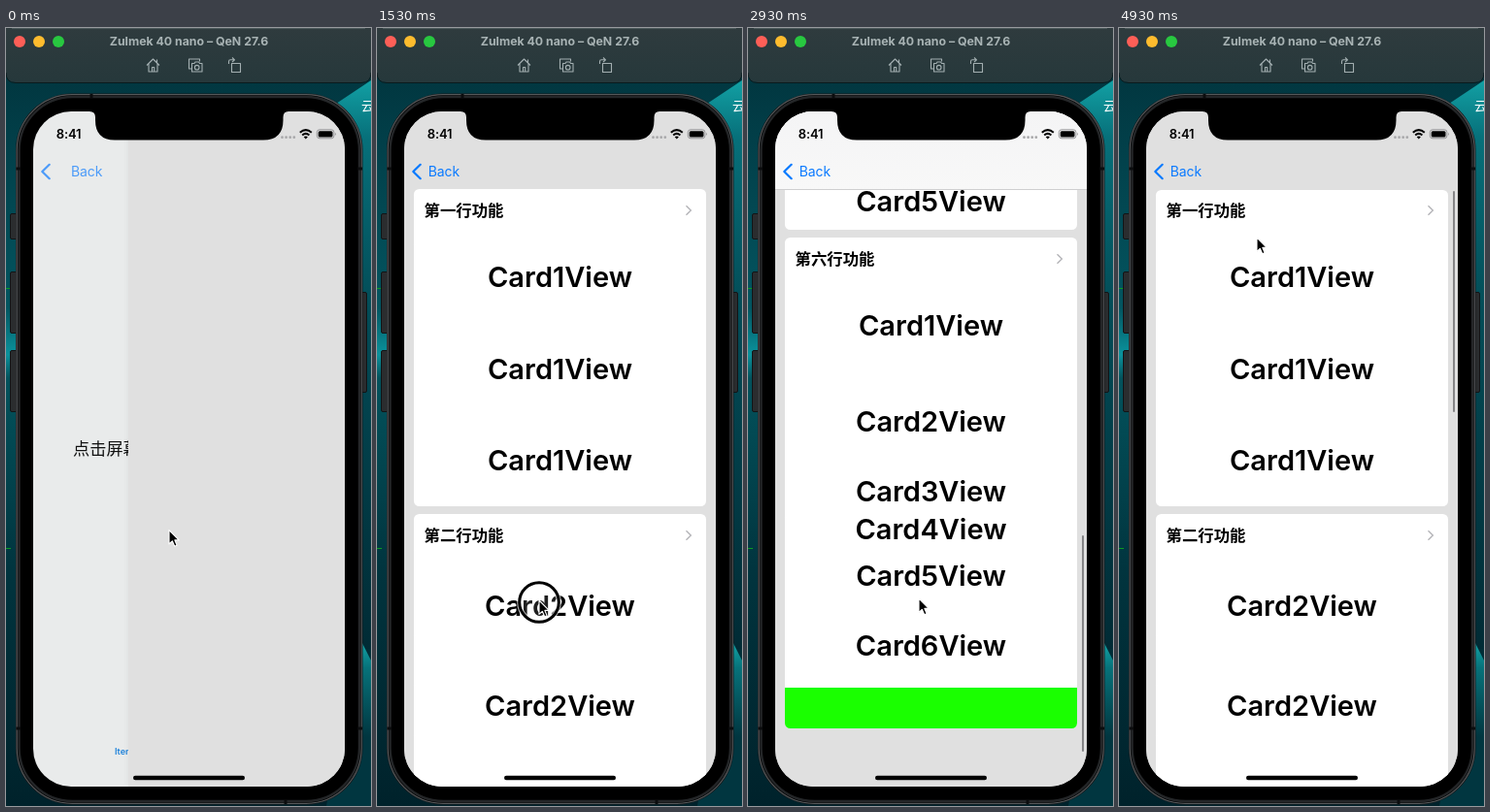
These frames come from a looping animation (376 px wide and 802 px high, 4990 ms). An HTML page:

```html
<!DOCTYPE html>
<html lang="zh">
<head>
<meta charset="utf-8">
<title>Expandable cards</title>
<style>
html, body { margin: 0; width: 100%; height: 100%; overflow: hidden; background: #00262e; }
#stage { position: relative; width: 376px; height: 802px; overflow: hidden; font-family: Inter, sans-serif; }
#stage > svg { position: absolute; left: 0; top: 0; }
#screen { position: absolute; left: 28px; top: 86px; width: 321px; height: 696px; border-radius: 39px; overflow: hidden; background: #e9ebeb; }
#world, #page { position: absolute; left: -28px; top: -86px; width: 376px; height: 802px; }
#page { left: 0; top: 0; }
#hint, #tab, #nav, #thumb, .fill, .card, .head { position: absolute; white-space: nowrap; }
.fill { left: 28px; top: 86px; width: 321px; height: 696px; background: #e0e0e0; box-shadow: 0 0 7px rgba(0,0,0,.06); }
.cjk { font-family: "Noto Sans CJK SC", "Noto Sans CJK", sans-serif; line-height: 24px; }
#hint { left: 136px; top: 421px; font-size: 17.2px; color: #111; }
#tab { left: 179px; top: 740px; font-size: 9px; line-height: 12px; font-weight: 600; color: #1b80da; }
.card { left: 38px; width: 301px; border-radius: 5.5px; background: #fff; overflow: hidden; }
.head { left: 10.5px; top: 8.5px; font-size: 16.4px; font-weight: 700; color: #000; }
.rows { position: absolute; left: 0; right: 0; text-align: center; font-size: 29px; font-weight: 600; color: #000; }
.green { background: #1aff00; }
.card svg { position: absolute; left: 279px; top: 15.5px; }
#nav { left: 28px; top: 86px; width: 321px; height: 80px; background: linear-gradient(#f4f4f5, #f8f8f8); border-bottom: 1px solid #cfcfd0; }
#thumb { left: 343.6px; width: 2.8px; border-radius: 2px; background: #858587; }
</style>
</head>
<body>
<div id="stage">
  <svg width="376" height="802" viewBox="0 0 376 802">
    <defs>
      <linearGradient id="wallL" x2="0" y2="1">
        <stop stop-color="#013039"/><stop offset=".36" stop-color="#035560"/><stop offset=".42" stop-color="#0b929c"/>
        <stop offset=".45" stop-color="#03525c"/><stop offset=".7" stop-color="#01343e"/><stop offset="1" stop-color="#00222b"/>
      </linearGradient>
      <linearGradient id="wallR" x2="0" y2="1">
        <stop stop-color="#12a0a4"/><stop offset=".1" stop-color="#07707a"/>
        <stop offset=".4" stop-color="#034c57"/><stop offset="1" stop-color="#012b35"/>
      </linearGradient>
      <linearGradient id="glow" x2="0" y2="1">
        <stop stop-color="#16b4b5"/><stop offset=".2" stop-color="#07727a"/><stop offset=".6" stop-color="#013640"/>
      </linearGradient>
      <linearGradient id="bar" x2="0" y2="1">
        <stop stop-color="#2f3b3e"/><stop offset="1" stop-color="#26383b"/>
      </linearGradient>
    </defs>
    <rect width="376" height="802" fill="url(#wallL)"/>
    <path d="M340 78L376 54V640H350V90Z" fill="url(#wallR)"/>
    <path d="M362 624L376 652V802H330Z" fill="url(#glow)"/>
    <path d="M0 268.5H5M0 536.5H5" stroke="#0b9a22"/>
    <path d="M0 0H376V46Q376 56 366 56H10Q0 56 0 46Z" fill="url(#bar)"/>
    <path d="M0 46Q0 56.5 10 56.5H366Q376 56.5 376 46" fill="none" stroke="#0a1a1d"/>
    <path d="M6 .5H370" stroke="#4c595b"/>
    <circle cx="14" cy="14" r="6" fill="#fe5f57"/>
    <circle cx="34" cy="14" r="6" fill="#febc2e"/>
    <circle cx="54" cy="14" r="6" fill="#28c840"/>
    <text x="188.5" y="18" text-anchor="middle" font-size="12.3" font-weight="700" fill="#a8b3b4">Zulmek 40 nano – QeN 27.6</text>
    <g fill="none" stroke="#a3afb1" stroke-width="1.1" stroke-linejoin="round">
      <path d="M145 38.5L151.5 32 158 38.5M147 37V45H156V37M150.5 45V40.5H152.7V45M155.5 35.5V32.5"/>
      <path d="M191 42H188.5V32H199.5V34.5M191.5 36.5H194L195 35H198.5L199.5 36.5H202V45H191.5Z"/>
      <circle cx="196.7" cy="40.7" r="2.3"/>
      <path d="M232.5 36.5H241.5V45.5H232.5ZM229.5 37V34.5Q229.5 32.8 231.2 32.8H235.5M233 30.5L235.5 32.8 233 35"/>
    </g>
    <text class="cjk" x="366" y="84.5" font-size="13" font-weight="500" fill="#fff">云</text>
    <g fill="#2b2d2f" stroke="#121416">
      <rect x="4.5" y="191.5" width="9" height="26" rx="1.5"/>
      <rect x="4.5" y="251.5" width="9" height="63" rx="1.5"/>
      <rect x="4.5" y="332.5" width="9" height="63" rx="1.5"/>
      <rect x="363" y="272.5" width="8.5" height="103" rx="1.5"/>
    </g>
    <rect x="10" y="67.5" width="357.5" height="733" rx="58" fill="#16181a"/>
    <rect x="11.2" y="68.7" width="355" height="730.6" rx="57" stroke="#55585a" stroke-width="1.2"/>
    <rect x="13.5" y="71" width="350.5" height="726" rx="55" stroke="#242628" stroke-width="2.4"/>
    <path d="M10.5 145H15M362.5 145H367M10.5 722H15M362.5 722H367M88 68V72M288 796V800" stroke="#0c0d0e" stroke-width="3"/>
  </svg>

  <div id="screen"><div id="world">
    <div id="old"><div id="hint" class="cjk">点击屏幕跳转</div><div id="tab">Item</div></div>
    <div id="page"><div class="fill"></div><div id="list"></div><div id="nav"></div><div id="thumb"></div></div>
  </div></div>

  <svg width="376" height="802" viewBox="0 0 376 802">
    <path d="M86 85V86Q92 86 92 92V95Q92 115.5 112 115.5H265Q285.5 115.5 285.5 95V92Q285.5 86 291 86V85Z"/>
    <text x="51.7" y="114" font-size="13" font-weight="600" letter-spacing="-.1">8:41</text>
    <path d="M284.5 112.7H298" stroke="#a9a9ab" stroke-width="2.8" stroke-linecap="round" stroke-dasharray="0 4.1"/>
    <path d="M302.8 107.8Q308.8 102.5 314.8 107.8M305.2 110.4Q308.8 107.4 312.4 110.4" fill="none" stroke="#000" stroke-width="2"/>
    <path d="M306.7 112.2Q308.8 110.7 310.9 112.2L308.8 114.6Z"/>
    <rect x="320.3" y="104.8" width="17.6" height="9" rx="2.7" fill="none" stroke="#8c8c8e" stroke-width=".9"/>
    <rect x="321.7" y="106.2" width="14.8" height="6.2" rx="1.5"/>
    <path d="M339 107.7Q340.7 109.3 339 110.9Z" fill="#8c8c8e"/>
    <g id="back">
      <path d="M44.7 140.8L37.3 148 44.7 155.2" fill="none" stroke="#0a7aff" stroke-width="2.2" stroke-linecap="round" stroke-linejoin="round"/>
      <text id="backText" y="153" font-size="14" letter-spacing="-.1" fill="#0a7aff">Back</text>
    </g>
    <rect x="131" y="770.8" width="115" height="4.4" rx="2.2"/>
    <g id="cursor">
      <g id="ring" fill="none">
        <circle cy="2" r="20.3" fill="#fff" fill-opacity=".12" stroke="#fff" stroke-opacity=".7" stroke-width="5"/>
        <circle cy="2" r="20.3" stroke="#000" stroke-width="3"/>
      </g>
      <path d="M0 0V14.4L3.3 11.3 5.7 16.8 8.1 15.8 5.8 10.4H10.2Z" stroke="#fff" stroke-width="1.1" stroke-linejoin="round"/>
    </g>
  </svg>
</div>

<script>
const LOOP = 4990, FRAMES = 75, STEP = LOOP / FRAMES;
const UNIT = .858;              // stage pixels per layout point
const TOP = 166.5, GAP = 10 * UNIT, HEAD = 50 * UNIT;
const $ = id => document.getElementById(id);

// height of CardNView in points; 0 is the plain green footer
const viewHeight = [50, 110, 120, 50, 40, 70, 100].map(h => h * UNIT);

function makeRow(n) {
  const h = viewHeight[n];
  return `<div class="${n ? 'row' : 'green'}" style="height:${h}px;line-height:${h + 1}px">${n ? `Card${n}View` : ''}</div>`;
}

function makeCard([label, views], i) {
  const rows = [...views].map(Number);
  const el = document.createElement('div');
  el.className = 'card';
  el.innerHTML = `<div class="head cjk">第${label}行功能</div>
    <svg width="8" height="12"><path d="M1.5 1.2L6.3 6 1.5 10.8" fill="none" stroke="#b4b4b8" stroke-width="1.4"/></svg>
    <div class="rows" style="top:${HEAD}px">${rows.map(makeRow).join('')}</div>`;
  $('list').append(el);
  const body = rows.reduce((sum, n) => sum + viewHeight[n], 0);
  return { el, body, start: i === 1 || i === 2 ? 258 : 560 };
}

const cards = [
  ['一', '111'], ['二', '222'], ['三', '3'], ['四', '4'], ['四', '45'], ['五', '5'], ['六', '1234560']
].map(makeCard);

// [time, scroll offset]: two flicks down, bounce, one flick back, bounce
const scrollStops = [[1530, 0], [2230, 726], [2260, 726], [2660, 1125], [3077, 1066], [3460, 1066], [4466, -45], [4900, 0]];

// [time, x, y]
const cursorStops = [
  [530, 168, 517.5], [1400, 167, 590], [1530, 167, 590], [1730, 180, 330], [2070, 185, 461], [2260, 182, 560],
  [2460, 186, 300], [2927, 176, 588], [3300, 172, 415], [3460, 172, 415], [3860, 178, 705], [4800, 142, 216]
];
const presses = [[1480, 1730], [2260, 2460], [3400, 3860]];

const clamp = (v, lo, hi) => Math.min(hi, Math.max(lo, v));
const easeInOut = p => (1 - Math.cos(Math.PI * p)) / 2;
const easeOut = p => 1 - (1 - clamp(p, 0, 1)) ** 3;

function at(stops, t, col = 1) {
  const next = stops.findIndex(s => s[0] > t);
  if (next < 0) return stops[stops.length - 1][col];
  const b = stops[next], a = stops[Math.max(0, next - 1)];
  if (a === b) return a[col];
  return a[col] + (b[col] - a[col]) * easeInOut((t - a[0]) / (b[0] - a[0]));
}

function drawList(t, scroll) {
  let y = TOP - scroll;
  $('list').style.visibility = t < 190 ? 'hidden' : 'visible';
  for (const { el, body, start } of cards) {
    const h = HEAD + body * easeOut((t - start) / 300);
    el.style.top = y + 'px';
    el.style.height = h + 'px';
    y += h + GAP;
  }
}

function drawThumb(t, scroll) {
  const y = 168 + Math.max(0, scroll) * .328;
  const end = Math.min(y + 228 + Math.min(0, scroll), 746);
  Object.assign($('thumb').style, {
    display: t > 1560 ? 'block' : 'none', top: y + 'px', height: end - y + 'px'
  });
}

function draw(t) {
  const push = t > 330 ? 0 : Math.exp(-t / 55);
  $('page').style.transform = `translateX(${98 * push}px)`;
  $('old').style.transform = `translateX(${-96.3 + 29.3 * push}px)`;
  $('backText').setAttribute('x', 52.7 + 14.3 * push);
  $('back').setAttribute('opacity', 1 - .3 * push);

  const scroll = at(scrollStops, t);
  drawList(t, scroll);
  drawThumb(t, scroll);
  $('nav').style.opacity = clamp(scroll / 16, 0, 1);

  $('cursor').setAttribute('transform', `translate(${at(cursorStops, t)} ${at(cursorStops, t, 2)})`);
  $('ring').style.display = presses.some(([a, b]) => t >= a && t < b) ? 'inline' : 'none';
}

const begin = performance.now();
function tick() {
  const t = (performance.now() - begin) % LOOP;
  draw(Math.floor((t + 1) / STEP) % FRAMES * STEP);
  requestAnimationFrame(tick);
}
tick();
</script>
</body>
</html>
```
